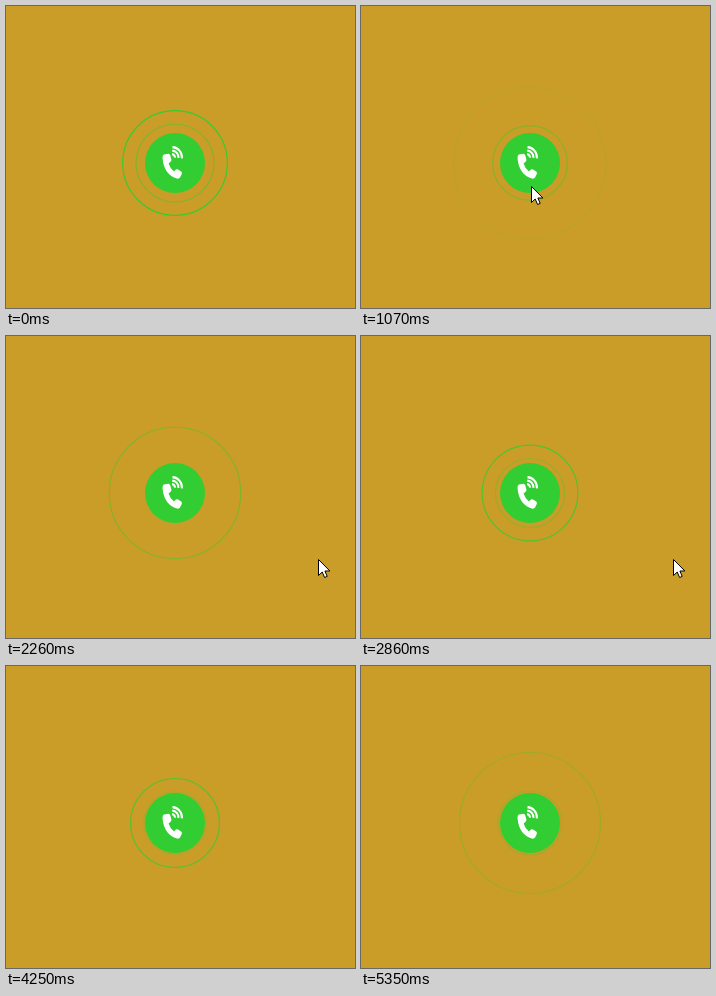
Animation, 349 px wide and 302 px high, one loop 5420 ms. Source, as an HTML page with a canvas:

```html
<!DOCTYPE html>
<html lang="en">
<head>
<meta charset="utf-8">
<title>Call button pulse</title>
<style>
  html, body { margin: 0; width: 100%; height: 100%; overflow: hidden; background: #c99d27; }
  canvas { display: block; }
</style>
</head>
<body>
<canvas id="stage" width="349" height="302"></canvas>
<script>
const ctx = document.getElementById('stage').getContext('2d');
const LOOP = 5420, STEPS = 82, STEP = LOOP / STEPS;
const CX = 169, CY = 157;
const GREEN = '#32cd32';
const PULSE = { period: 1485, lead: 752, lag: 380, from: 26, to: 78 };

const POINTER = {
  shown: 330, hidden: 3680, x: 232, y: 262,
  glides: [
    { at: 330, lasts: 260, x: 168, y: 202 },
    { at: 595, lasts: 265, x: 170, y: 180 },
    { at: 1860, lasts: 340, x: 312, y: 223 },
    { at: 3180, lasts: 490, x: 326, y: 298 },
  ],
};

const handset = new Path2D(
  'M158 148.6L162.4 147.8Q163.9 147.8 164.3 149.4L165.4 153.6Q165.6 154.9 164.6 155.7' +
  'L162.6 157.4Q163.9 162.2 168 165.4L169.9 163.6Q170.9 162.8 172 163.4L175.2 165.6' +
  'Q176.3 166.6 175.8 168L174 171.6Q173 173 171 172.5Q158.4 169 156.6 153Q156.3 149.4 158 148.6Z');
const arrow = new Path2D('M.5 .5V16.5L4.2 13L6.6 18.5L9.2 17.4L6.9 12H11.9Z');

const easeOut = k => 1 - (1 - k) ** 2;
const clamp = k => Math.min(1, Math.max(0, k));

function circle(radius) {
  ctx.beginPath();
  ctx.arc(CX, CY, radius, 0, 2 * Math.PI);
}

// Grows linearly; brightest halfway through its period.
function ring(time) {
  const p = (time / PULSE.period) % 1;
  ctx.globalAlpha = 1 - Math.abs(2 * p - 1);
  ctx.strokeStyle = GREEN;
  ctx.lineWidth = 1.1;
  circle(PULSE.from + (PULSE.to - PULSE.from) * p);
  ctx.stroke();
  ctx.globalAlpha = 1;
}

function button() {
  ctx.fillStyle = GREEN;
  circle(30);
  ctx.fill();
  ctx.fillStyle = ctx.strokeStyle = '#fff';
  ctx.fill(handset);
  ctx.lineWidth = 2.1;
  for (let i = 0; i < 3; i++) {
    ctx.beginPath();
    ctx.arc(165.8, 151.2, 3.1 + 3.5 * i, -1.5, 0.12);
    ctx.stroke();
  }
}

function pointer(t) {
  if (t < POINTER.shown || t > POINTER.hidden) return;
  let { x, y } = POINTER;
  for (const glide of POINTER.glides) {
    const k = easeOut(clamp((t - glide.at) / glide.lasts));
    x += (glide.x - x) * k;
    y += (glide.y - y) * k;
  }
  ctx.save();
  ctx.translate(Math.round(x), Math.round(y));
  ctx.fillStyle = '#fff';
  ctx.strokeStyle = '#000';
  ctx.lineWidth = 1;
  ctx.fill(arrow);
  ctx.stroke(arrow);
  ctx.restore();
}

function draw(now) {
  // The picture advances in even steps rather than continuously.
  const t = Math.floor((now % LOOP) / STEP + 0.2) % STEPS * STEP;
  ctx.fillStyle = '#c99d27';
  ctx.fillRect(0, 0, 349, 302);
  ring(t + PULSE.lead);
  ring(t + PULSE.lead - PULSE.lag);
  button();
  pointer(t);
}

const start = performance.now();
function loop() {
  draw(performance.now() - start);
  requestAnimationFrame(loop);
}
loop();
</script>
</body>
</html>
```
